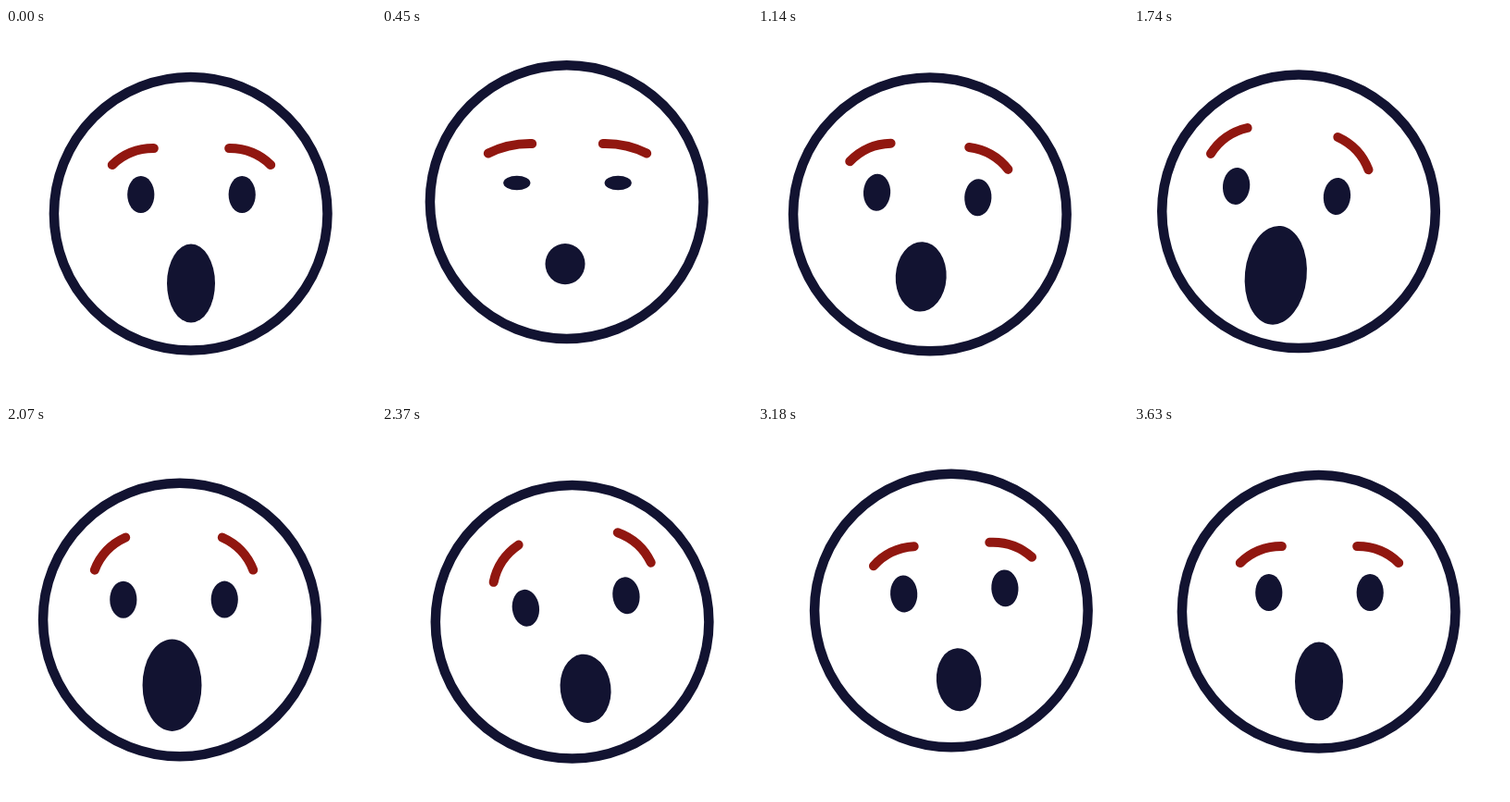
Animation, 400 px wide and 400 px high, one loop 5.66 s. Source, as an HTML page:

```html
<!DOCTYPE html>
<html lang="en">
<head>
<meta charset="utf-8">
<title>Surprised face</title>
<style>
  html, body { margin: 0; width: 100%; height: 100%; overflow: hidden; background: #fff; }
  svg { display: block; width: 100%; height: 100%; }
  .brow { fill: none; stroke: #911710; stroke-width: 10; stroke-linecap: round; }
</style>
</head>
<body>
<svg viewBox="0 0 400 400" fill="#121331">
  <g id="face">
    <circle r="147.8" fill="#fff" stroke="#121331" stroke-width="10.5"/>
    <g id="features">
      <ellipse class="eye" cx="-54.7"/>
      <ellipse class="eye" cx="54.7"/>
      <path class="brow"/>
      <g transform="scale(-1 1)"><path class="brow"/></g>
      <ellipse id="mouth"/>
    </g>
  </g>
</svg>
<script>
const LOOP = 5660, STEP = 30;
const face = document.getElementById("face");
const features = document.getElementById("features");
const mouth = document.getElementById("mouth");
const eyes = document.querySelectorAll(".eye");
const brows = document.querySelectorAll(".brow");

function set(el, attrs) {
  for (const name in attrs) el.setAttribute(name, attrs[name]);
}

function draw(t) {
  // Sine ease from 0 to 1 between two times.
  const ease = (from, to) => {
    const p = Math.min(1, Math.max(0, (t - from) / (to - from)));
    return (1 - Math.cos(Math.PI * p)) / 2;
  };

  // Phases of the act; every value is its rest pose plus shares of these.
  const dip = ease(0, 210);
  const jump = ease(210, 470);
  const inhale = ease(0, 470);
  const gasp = ease(540, 1740);
  const lean = ease(840, 1740);
  const look = ease(1720, 2830);
  const close = ease(1830, 2880);
  const settle = ease(2860, 3440);
  const blink = jump - ease(470, 700);

  const x = 199.7 - 21.7 * ease(480, 1600) + 43.6 * look - 21.9 * settle;
  const y = 200.7 + 19.8 * dip - 32.9 * jump + 13.8 * ease(480, 1140)
    - 4.8 * ease(1140, 1600) + 16.4 * ease(1600, 2280) - 19.6 * ease(2280, 2850)
    + 9.1 * ease(2850, 3390) - 1.8 * ease(3390, 3630);
  set(face, { transform: `translate(${x} ${y})` });

  const shiftX = 0.8 - 13.8 * lean + 20 * ease(1740, 2580) - 6.2 * settle;
  const shiftY = -20.6 - 1.2 * lean + 1.2 * settle;
  const turn = 5.8 * gasp - 13.4 * ease(1740, 2460) + 7.6 * settle;
  set(features, { transform: `translate(${shiftX} ${shiftY}) rotate(${turn})` });

  for (const eye of eyes) set(eye, { rx: 14.6, ry: 20 - 12.5 * blink });

  // Brows pivot on their outer ends and flatten as they drop.
  const tilt = 21.8 - 9.4 * inhale + 28.6 * gasp + 8.5 * ease(1740, 2300) - 27.7 * ease(2300, 3270);
  const bulge = Math.min(5, tilt * 0.24);
  for (const brow of brows) set(brow, {
    d: `M0 0Q24 ${-2 * bulge} 48.5 0`,
    transform: `translate(-85.7 -32) rotate(${-tilt})`
  });

  set(mouth, {
    cx: -0.5 - 2 * inhale + 2 * look,
    cy: 96 - 8.4 * inhale + 4 * lean + 4.4 * look,
    rx: 26 - 4.5 * inhale + 11.9 * gasp - 11.6 * close + 4.2 * settle,
    ry: 42.5 - 20.5 * inhale + 31.5 * gasp - 31.1 * close + 20.1 * settle
  });
}

const start = performance.now();
function tick() {
  const t = (performance.now() - start) % LOOP;
  draw(Math.floor(t / STEP) * STEP);
  requestAnimationFrame(tick);
}
tick();
</script>
</body>
</html>
```
